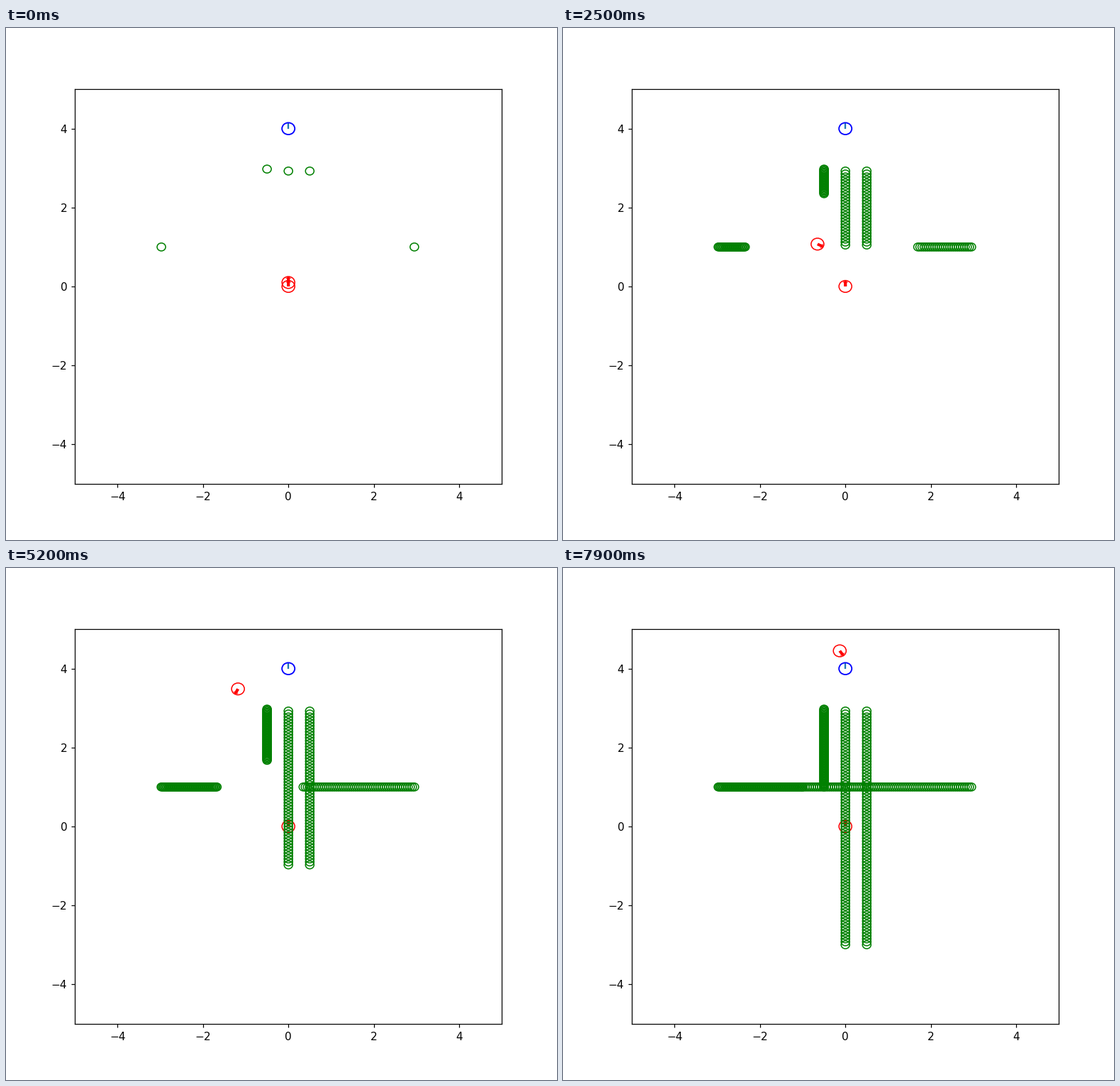
Write a matplotlib script that moves like this. It is 777 px wide and 721 px high and loops after 8000 ms.

```python
import numpy as np
import matplotlib.pyplot as plt
from matplotlib.animation import FuncAnimation
from matplotlib.patches import Circle, FancyArrow

FRAMES, INTERVAL = 80, 100
STEP, R_ROBOT, R_OBST = 0.1, 0.15, 0.1
SLOW = 0.025  # obstacle speeds are multiples of this

# first reverse and arrival at the goal
REVERSE, ARRIVE = 12, 67


def headings(n):
    """Steady right turn, then a left turn close to the goal."""
    return np.radians(np.interp(n, [0, 16, 33, 41, 46, 60, 79],
                                [90, 14, -62, -90, -92, -152, -55]))


def gears(n):
    """Forward, then reverse, then rocking to and fro at the goal."""
    rocking = np.where(n % 2, 1, -1) * (n > ARRIVE + 1)
    return np.where(n <= REVERSE, 1, np.where(n <= ARRIVE, -1, rocking))


def obstacles(n):
    """Centres of all obstacles at step n."""
    d = SLOW * (n + 1)
    return [(0, 3 - 3 * d), (0.5, 3 - 3 * d), (-0.5, 3 - d), (-3 + d, 1), (3 - 2 * d, 1)]


def add_ring(xy, r, color, lw=1.0, z=2):
    return ax.add_patch(Circle(xy, r, fill=False, ec=color, lw=lw, zorder=z))


def pointer(a):
    return R_ROBOT * np.cos(a), R_ROBOT * np.sin(a)


def add_robot(x, y, a):
    ring = add_ring((x, y), R_ROBOT, "red")
    arrow = FancyArrow(x, y, *pointer(a), width=0.07, head_width=0.14, head_length=0.05,
                       length_includes_head=True, fc="red", lw=0, zorder=2)
    return ring, ax.add_patch(arrow)


fig, ax = plt.subplots(figsize=(7, 6.499), dpi=111)
ax.set_xlim(-5, 5)
ax.set_ylim(-5, 5)

steps = np.arange(FRAMES)
angles = headings(steps)
xs = np.cumsum(STEP * gears(steps) * np.cos(angles))
ys = np.cumsum(STEP * gears(steps) * np.sin(angles))

add_robot(0, 0, np.pi / 2)
ring, arrow = add_robot(xs[0], ys[0], angles[0])

ax.plot([0, 0], [4, 4 + R_ROBOT], color="tab:blue", lw=1.5, solid_capstyle="butt")
add_ring((0, 4), R_ROBOT, "blue", 1.2, 3)

trail = [[add_ring(xy, R_OBST, "green", z=4) for xy in obstacles(n)] for n in steps]


def update(n):
    for k, rings in enumerate(trail):
        for c in rings:
            c.set_visible(k <= n)
    dx, dy = pointer(angles[n])
    ring.center = xs[n], ys[n]
    arrow.set_data(x=xs[n], y=ys[n], dx=dx, dy=dy)
    return []


anim = FuncAnimation(fig, update, frames=FRAMES, interval=INTERVAL,
                     repeat=True, repeat_delay=0, blit=False)
plt.show()
```
